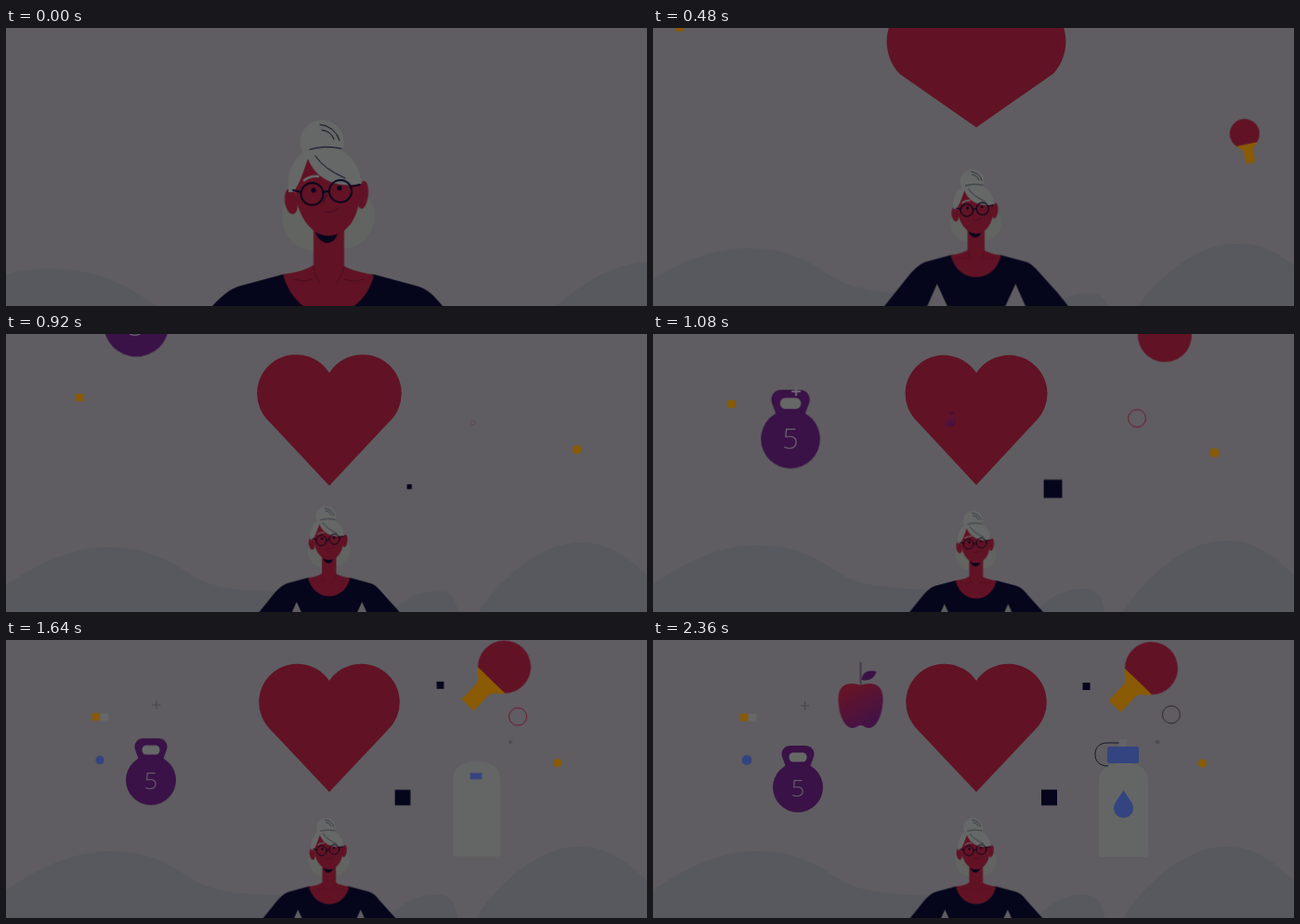
Recreate the animation shown at these times as an HTML page without scripts. Size 690 by 300 pixels, loop 2400 ms.

```html
<!DOCTYPE html>
<html lang="en">
<head>
<meta charset="utf-8">
<title>Healthy habits</title>
<style>
  html, body { margin: 0; width: 100%; height: 100%; overflow: hidden; background: #5f5d61; }
  svg { display: block; width: 690px; height: 300px; }

  :root {
    --red: #611325; --navy: #05061c; --purple: #3a1247;
    --orange: #8a5a04; --blue: #334480; --white: #666867;
  }
  .red { fill: var(--red); }
  .navy { fill: var(--navy); }
  .purple { fill: var(--purple); }
  .orange { fill: var(--orange); }
  .blue { fill: var(--blue); }
  .white { fill: var(--white); }
  .line { fill: none; stroke: var(--navy); stroke-linecap: round; }

  .a { animation: 2400ms linear infinite; }

  /* scenery */
  .hills { fill: #57595f; transform-origin: 348px 300px; animation-name: hills; }
  @keyframes hills {
    0% { transform: translateY(52px) scale(1.28); }
    5% { transform: translateY(37px) scale(1.185); }
    10% { transform: translateY(26px) scale(1.12); }
    20% { transform: translateY(13px) scale(1.045); }
    28.33% { transform: translateY(7px) scale(1.015); }
    45%, 100% { transform: none; }
  }

  /* woman */
  .woman { transform-origin: 348px 266px; animation-name: woman; }
  @keyframes woman {
    0% { transform: none; }
    5% { transform: translateY(-9px) scale(.82); }
    10% { transform: translateY(-16px) scale(.69); }
    15% { transform: translateY(-20px) scale(.61); }
    20% { transform: translateY(-21px) scale(.556); }
    28.33% { transform: translateY(-11px) scale(.498); }
    36% { transform: translateY(-4px) scale(.468); }
    45% { transform: scale(.451); }
    58.33%, 100% { transform: scale(.4444); }
  }

  /* heart */
  .heart { animation-name: heart; }
  @keyframes heart {
    0%, 10% { d: path("M348-5L262-58A54 54 0 1 1 348-118A54 54 0 1 1 434-58Z"); }
    20% { d: path("M348 107L265 49A51.3 51.3 0 1 1 348-10A51.3 51.3 0 1 1 431 49Z"); }
    28.33% { d: path("M348 167L283 99A44 44 0 1 1 348 42A44 44 0 1 1 413 99Z"); animation-timing-function: ease-out; }
    45% { d: path("M348 163L284 94A41.5 41.5 0 1 1 348 42A41.5 41.5 0 1 1 412 94Z"); }
    58.33%, 100% { d: path("M348 164L284 96A41.4 41.4 0 1 1 348 44A41.4 41.4 0 1 1 412 96Z"); }
  }

  /* paddle */
  .paddle { animation-name: paddle; }
  @keyframes paddle {
    0% { transform: translate(660px, 340px) rotate(560deg) scale(.2); }
    10% { transform: translate(655px, 290px) rotate(500deg) scale(.3); }
    20% { transform: translate(637px, 115px) rotate(349deg) scale(.56); }
    25% { transform: translate(619px, 18px) rotate(260deg) scale(1.05); }
    28.33% { transform: translate(616px, -30px) rotate(210deg) scale(1.37); }
    36% { transform: translate(583px, -55px) rotate(180deg) scale(1.18); }
    45% { transform: translate(551px, 1px) rotate(140deg) scale(1.02); }
    51% { transform: translate(541px, 38px) rotate(75deg); }
    58.33% { transform: translate(537px, 38.5px) rotate(44deg); }
    68% { transform: translate(536.5px, 29px) rotate(44deg); }
    78.33%, 100% { transform: translate(536.5px, 30.5px) rotate(44deg); }
  }

  /* kettlebell */
  .bell { transform-origin: 156px 159px; animation-name: bell; }
  @keyframes bell {
    0%, 33% { transform: translate(-22px, -270px) scale(1.4); }
    45% { transform: translate(-8px, -46px) scale(1.18); }
    52% { transform: translate(-4px, -4px) scale(1.06); }
    58.33% { transform: translate(-1.3px, 0); }
    68% { transform: translateY(-8px); }
    78.33% { transform: translateY(-4px); }
    90%, 100% { transform: none; }
  }
  .ball { animation-name: ball; }
  @keyframes ball {
    0%, 50%, 68%, 100% { y: 132px; height: 54px; }
    58.33% { y: 113px; height: 75px; }
  }
  .grip { animation-name: grip; }
  @keyframes grip {
    0%, 50%, 68%, 100% { transform: none; }
    58.33% { transform: translateY(-18px); }
  }
  .five { font: 300 26px "Open Sans", "Noto Sans", sans-serif; text-anchor: middle; fill: #66586b; animation-name: five; }
  @keyframes five {
    0%, 50%, 68%, 100% { transform: none; }
    58.33% { transform: translateY(3px); }
  }

  /* apple */
  .apple { animation-name: apple; }
  @keyframes apple {
    0%, 41% { transform: translate(338px, 125px) scale(0); }
    45% { transform: translate(320px, 94px) scale(.25); }
    58.33% { transform: translate(244px, -9px) scale(.9, .95); }
    67% { transform: translate(228px, -60px); }
    78.33% { transform: translate(223.5px, 11px) scale(1, 1.15); }
    87% { transform: translate(223.5px, 78px) scale(1, .96); }
    94%, 100% { transform: translate(223.5px, 71px); }
  }

  /* bottle */
  .floor { stroke: #3b3d44; animation-name: floor; }
  @keyframes floor {
    0%, 54% { opacity: 0; }
    57%, 59% { opacity: 1; }
    62%, 100% { opacity: 0; }
  }
  .flask { transform-origin: 506.5px 234px; animation-name: flask; }
  @keyframes flask {
    0%, 58.5% { transform: scale(1, 0); }
    69% { transform: scale(.96, 1.08); }
    78.33% { transform: scale(.97, .955); }
    88%, 100% { transform: none; }
  }
  .drop { transform-origin: 506.5px 190px; animation-name: drop; }
  @keyframes drop {
    0%, 66% { transform: scale(0); }
    78.33% { transform: translateY(-2.5px) scale(1.23); }
    88%, 100% { transform: none; }
  }
  .cap { transform-origin: 506px 133px; animation-name: cap; }
  @keyframes cap {
    0%, 65% { transform: translateY(30px) scale(0); }
    74% { transform: translateY(-4px); }
    78.33% { transform: translateY(-1px); }
    86%, 100% { transform: none; }
  }
  .spout { transform-origin: 506px 116px; animation-name: spout; }
  @keyframes spout {
    0%, 72% { transform: scale(0); }
    78.33% { transform: scale(1, 1.9); }
    88%, 100% { transform: none; }
  }
  .strap { fill: none; animation-name: strap; }
  @keyframes strap {
    0%, 71% { opacity: 0; d: path("M490 134C484 134 482 131 482 126L482 112C482 104 488 100 490 104C492 108 496 110 502 112"); }
    78.33% { opacity: 1; stroke: #3a1320; d: path("M490 135C481 135 476 130 476 122L476 98C476 88 487 84 488 93C489 104 492 107 502 111"); }
    90%, 100% { opacity: 1; stroke: #16172a; d: path("M490 136C481 136 476 131 476 124L476 123C476 115 482 111 489 111C494 111 498 111 502 111"); }
  }

  /* confetti */
  .tiles { animation-name: tiles; }
  @keyframes tiles {
    0%, 10% { transform: translate(-108px, -130px); }
    20% { transform: translate(-70px, -84px); }
    28.33% { transform: translate(-43px, -48px); animation-timing-function: cubic-bezier(.3, .5, .6, 1); }
    45% { transform: translate(-14px, -8px); animation-timing-function: ease-out; }
    58.33% { transform: translate(-4px, -1.5px); animation-timing-function: ease-out; }
    78.33%, 100% { transform: none; }
  }
  .tile2 { transform-origin: 102px 83px; animation-name: tile2; }
  @keyframes tile2 {
    0%, 48% { transform: scale(0, 1); }
    57%, 100% { transform: none; }
  }
  .plus { fill: none; transform-origin: 163.5px 71px; animation-name: plus; }
  @keyframes plus {
    0%, 38% { transform: translate(-18px, -16px) scale(0); stroke: #6a686c; stroke-width: 2px; }
    45% { transform: translate(-9.5px, -9px) scale(1.1); stroke: #6a686c; stroke-width: 2px; }
    58.33% { transform: translate(-3.5px, -2px); stroke: #48464c; stroke-width: 1px; }
    78.33%, 100% { transform: none; stroke: #48464c; stroke-width: 1.2px; }
  }
  .ring { fill: none; transform-origin: 558px 80.5px; animation-name: ring; }
  @keyframes ring {
    0%, 36% { transform: translate(-62px, 17px) scale(0); stroke: #70172d; }
    45% { transform: translate(-37px, 10.5px); stroke: #70172d; }
    58.33% { transform: translate(-18px, 5.5px); stroke: #70172d; animation-timing-function: ease-out; }
    78.33% { transform: translate(-2px, .7px); stroke: #70172d; }
    100% { transform: none; stroke: #29272e; }
  }
  .sun { transform-origin: 591.5px 133px; animation-name: sun; }
  @keyframes sun {
    0%, 28.33% { transform: translate(56px, -20px) scale(0); }
    33% { transform: translate(40px, -14px); animation-timing-function: ease-out; }
    45% { transform: translate(13px, -5px) scale(1.12); animation-timing-function: ease-out; }
    58.33% { transform: translate(4.5px, -1px); }
    78.33%, 100% { transform: none; }
  }
  .box { transform-origin: 426.5px 170px; animation-name: box; }
  @keyframes box {
    0%, 36% { transform: translate(9px, -6px) scale(0); }
    45% { transform: translate(4px, -3px) scale(1.16); }
    58.33% { transform: translate(1px, 0) scale(.97); }
    78.33%, 100% { transform: none; }
  }
  .chip { transform-origin: 466.5px 50px; animation-name: chip; }
  @keyframes chip {
    0%, 47% { transform: translate(6px, -7px) scale(0); }
    58.33% { transform: translate(2px, -2.5px) scale(.95); }
    78.33%, 100% { transform: none; }
  }
  .late { transform-box: fill-box; transform-origin: center; animation-name: late; }
  @keyframes late {
    0%, 62% { transform: scale(0); }
    71% { transform: scale(1.2); }
    78.33%, 100% { transform: none; }
  }
</style>
</head>
<body>
<svg viewBox="0 0 690 300" xmlns="http://www.w3.org/2000/svg">
  <defs>
    <linearGradient id="skin" x1=".2" y1="0" x2=".75" y2="1">
      <stop offset=".1" stop-color="#651427"/>
      <stop offset="1" stop-color="#40124a"/>
    </linearGradient>
  </defs>

  <g class="a paddle">
    <circle class="red" r="28.5"/>
    <path class="orange" d="M-20.3 20H20.3C15 28 9 27 9 35V57H-9V35C-9 27-15 28-20.3 20Z"/>
  </g>

  <g class="a hills">
    <path d="M-60 320V290C-30 288-10 277 0 270C35 246 72 228 112 228C155 228 178 243 200 258C222 271 245 274 300 276V320Z"/>
    <path d="M395 320C415 297 430 274 466 275C482 276 485 288 490 320Z"/>
    <path d="M495 320C512 285 535 262 552 249C573 233 594 223 617 223C648 223 668 239 690 260C708 276 725 284 750 290V320Z"/>
  </g>

  <path class="a heart red"/>

  <g class="a woman">
    <!-- back hair -->
    <path fill="#616461" d="M309 172C297 184 294 205 301 221C309 236 322 241 334 241L362 238C382 240 397 221 397 202C397 190 390 181 382 177Z"/>
    <!-- arms and torso -->
    <path class="navy" d="M298 266L250 279C240 283 236 286 222 300L190 340L166 370L145 405H235L272 322L294 370L300 440H396L402 370L424 322L461 405H551L530 370L506 340L470 300C460 288 455 283 444 279L396 266Z"/>
    <!-- neck and chest -->
    <path class="red" d="M331 205V256C322 262 311 264 298 266C306 294 325 309 347 309C370 309 389 294 396 267C384 264 372 262 364 257V205Z"/>
    <path fill="none" stroke="#4c0f20" d="M331 257Q333 270 338 275M364 258Q361 269 355 275M364 271Q374 275 386 271M310 271Q322 275 330 271"/>
    <path class="navy" d="M333 220Q345 227 357 222Q354 232 345 232Q336 230 333 220Z"/>
    <!-- face -->
    <ellipse class="red" cx="307" cy="187" rx="7" ry="14" transform="rotate(-8 307 187)"/>
    <ellipse class="red" cx="384" cy="180" rx="6" ry="15" transform="rotate(6 384 180)"/>
    <path class="red" d="M313 160L325 140L382 160C383 192 375 223 347 224C322 222 312 194 311 172Z"/>
    <!-- hair -->
    <circle class="white" cx="340" cy="122.500" r="23.500"/>
    <path class="white" d="M304 177C301 151 313 132 334 128C358 124 381 140 383 168C364 172 336 169 325 141C320 154 317 167 309 177Z"/>
    <path class="line" d="M338 104Q354 106 359 121M340 110Q350 111 353 120M327 131Q343 126 361 130M333 138Q342 152 365 162"/>
    <path fill="none" stroke="#696b6a" stroke-width="2.500" d="M320 165Q327 159 337 160"/>
    <!-- glasses -->
    <g class="line" stroke-width="2">
      <circle cx="329.500" cy="179" r="12"/>
      <circle cx="360" cy="176" r="12"/>
      <path d="M341 178Q345 175 348 177M317 177L309 175M371 171L381 169"/>
    </g>
    <circle class="navy" cx="331" cy="175" r="2.600"/>
    <circle class="navy" cx="359" cy="172.500" r="2.600"/>
    <path fill="none" stroke="#3c0d20" stroke-linecap="round" d="M346 179Q342 185 341 189M342 198Q352 201 358 194"/>
  </g>

  <g class="a bell">
    <g class="a grip">
      <path class="purple" d="M148 114H164C171 114 175 120 173 126L169 137H143L139 126C137 120 141 114 148 114Z"/>
      <rect class="white" x="146.500" y="121.500" width="19" height="10" rx="4.500"/>
    </g>
    <rect class="a ball purple" x="129" y="132" width="54" height="54" rx="27"/>
    <text class="a five" x="156" y="168.500">5</text>
  </g>

  <g class="a apple">
    <path stroke="#2b1830" d="M0-47V-22"/>
    <path class="purple" d="M1-28C2-37 9-39 17-37C15-30 9-26 1-28Z"/>
    <path fill="url(#skin)" d="M0-22C7-25 24-27 24-8C24 10 17 24 9 24C4 24 4 21 0 21C-4 21-4 24-9 24C-17 24-24 10-24-8C-24-27-7-25 0-22Z"/>
  </g>

  <path class="a floor" d="M478 232.500H530"/>
  <path class="a flask" fill="#646665" d="M480 232V153C480 140 488 135 498 133H515C525 135 533 140 533 153V232Q533 234 531 234H482Q480 234 480 232Z"/>
  <path class="a drop blue" d="M506.500 162C510 169 517 175 517 181.500A10.500 10.500 0 0 1 496 181.500C496 175 503 169 506.500 162Z"/>
  <path class="a strap"/>
  <rect class="a spout" x="501.500" y="107" width="9" height="9" rx="3" fill="#646568"/>
  <rect class="a cap blue" x="489" y="115" width="34" height="18" rx="2.500"/>

  <g class="a tiles">
    <rect class="orange" x="94" y="79.500" width="8.500" height="8"/>
    <rect class="a tile2 white" x="102.500" y="79.500" width="9" height="8"/>
  </g>
  <path class="a plus" d="M159 71H168M163.500 66.500V75.500"/>
  <circle class="a ring" cx="558" cy="80.500" r="9.500"/>
  <circle class="a sun orange" cx="591.500" cy="133" r="4.600"/>
  <rect class="a box navy" x="418" y="161.500" width="17" height="17"/>
  <rect class="a chip navy" x="462.500" y="46" width="8" height="8"/>
  <circle class="a late blue" cx="101" cy="129.500" r="5.400"/>
  <circle class="a late" fill="#4d4b53" cx="543" cy="110" r="2.300"/>
</svg>
</body>
</html>
```
